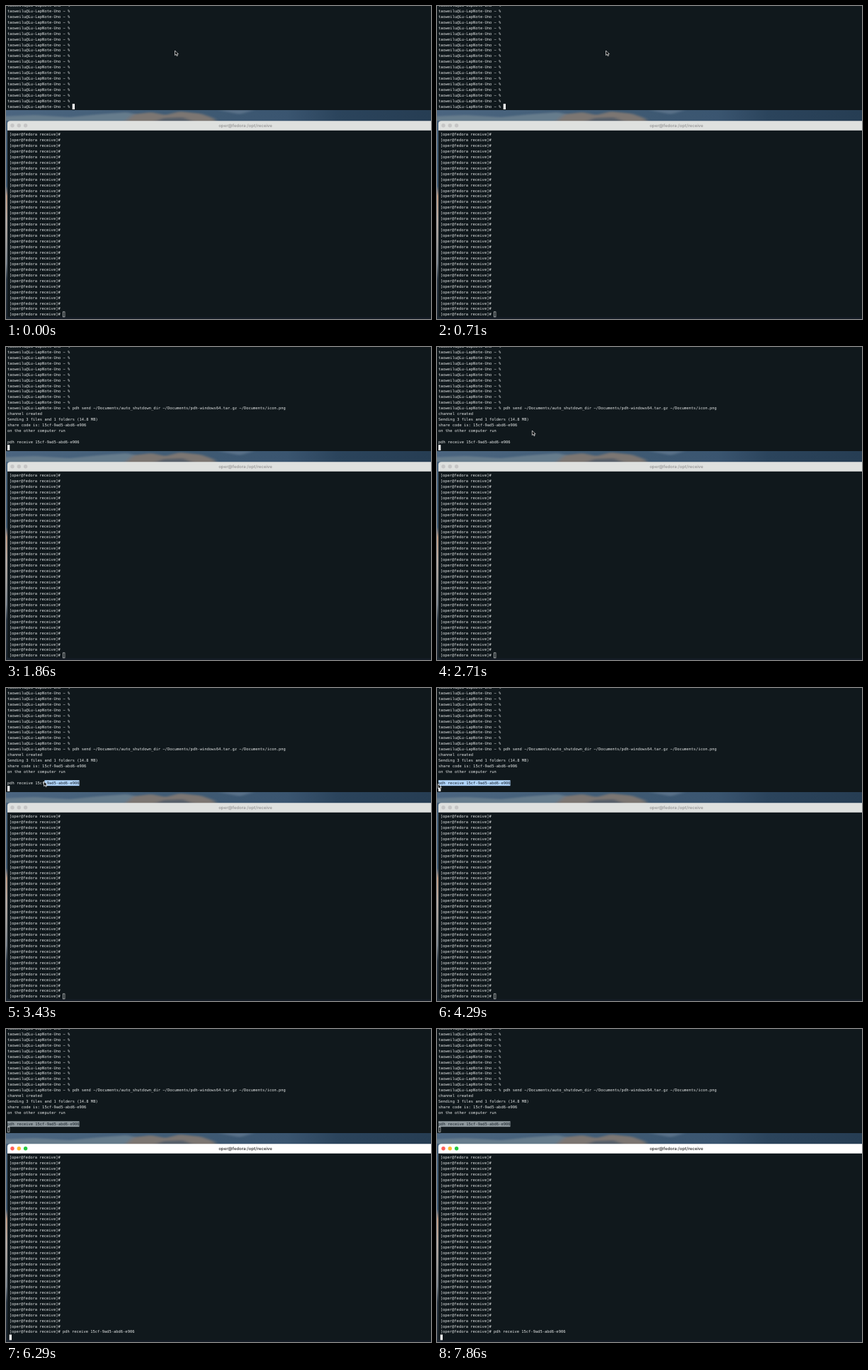
Write an HTML page that moves like this. It is 600 px wide and 442 px high and loops after 8000 ms.

```html
<!DOCTYPE html>
<html lang="en">
<head>
<meta charset="utf-8">
<title>Sending files between two terminals</title>
<style>
  html, body { margin: 0; width: 100%; height: 100%; overflow: hidden; background: #10181c; }
  svg { display: block; width: 100vw; height: 100vh; }
  text { white-space: pre; text-rendering: geometricPrecision; }
  .term { font: 5.44px "DejaVu Sans Mono", monospace; fill: #e2e5e5; }
  #title { font: 600 6px Inter, sans-serif; text-anchor: middle; }
</style>
</head>
<body>
<svg viewBox="0 0 600 442">
  <defs>
    <linearGradient id="sky">
      <stop offset="0" stop-color="#4b6580"/>
      <stop offset=".2" stop-color="#46617b"/>
      <stop offset=".45" stop-color="#3f5a73"/>
      <stop offset=".66" stop-color="#3a5570"/>
      <stop offset=".78" stop-color="#2b445c"/>
      <stop offset="1" stop-color="#263d53"/>
    </linearGradient>
    <linearGradient id="side" x2="0" y2="1">
      <stop offset="0" stop-color="#46607a"/>
      <stop offset=".33" stop-color="#3f5a75"/>
      <stop offset=".38" stop-color="#bd9880"/>
      <stop offset=".5" stop-color="#b5a9a2"/>
      <stop offset=".6" stop-color="#a09c9a"/>
      <stop offset=".72" stop-color="#77808a"/>
      <stop offset=".8" stop-color="#2a3644"/>
      <stop offset="1" stop-color="#1b2530"/>
    </linearGradient>
    <filter id="soft"><feGaussianBlur stdDeviation="3 1"/></filter>
    <clipPath id="gap"><path d="M0 147H600V176H0Z"/></clipPath>
  </defs>

  <rect width="600" height="442" fill="#151c26"/>
  <rect y="147" width="600" height="20" fill="url(#sky)"/>
  <g clip-path="url(#gap)"><g filter="url(#soft)">
    <path d="M-10 166V156L40 154L90 157L130 153L170 150L190 154V166Z" fill="#667b8c"/>
    <path d="M165 166L180 153L205 150L225 154L245 149L275 152L292 158L300 166Z" fill="#7c7672"/>
    <path d="M205 166L222 158L250 157L270 166Z" fill="#59606a"/>
    <path d="M300 147L350 147L330 153Z" fill="#587087"/>
  </g></g>
  <rect y="162" width="6" height="280" fill="url(#side)"/>
  <rect width="600" height="147" fill="#10181c"/>

  <path d="M2 175H600V439.5H5Q2 439.5 2 436.5Z" fill="#10181c"/>
  <path id="bar" d="M2 175.7V166.3Q2 162.3 6 162.3H600V175.7Z"/>
  <g id="lights">
    <circle cx="9" cy="168.8" r="2.7"/>
    <circle cx="18.3" cy="168.8" r="2.7"/>
    <circle cx="27.6" cy="168.8" r="2.7"/>
  </g>
  <text id="title" x="338" y="170.9">oper@fedora:/opt/receive</text>

  <rect id="sel" y="130.2" height="7.96"/>
  <g id="top" class="term"></g>
  <g id="bottom" class="term"></g>
  <rect id="topCursor" stroke-width=".7"/>
  <rect id="bottomCursor" stroke-width=".7"/>

  <path id="arrow" d="M0 0V6.6L1.6 5.2L2.7 7.6L3.8 7.1L2.8 4.8H4.8Z" fill="#000" stroke="#fff" stroke-width=".7"/>
  <path id="beam" d="M-1.8 -3.8Q0 -3.8 0 -2.6Q0 -3.8 1.8 -3.8M0 -2.6V2.6M-1.8 3.8Q0 3.8 0 2.6Q0 3.8 1.8 3.8M-1 1H1" fill="none" stroke="#e8e8e8" stroke-width=".8"/>
</svg>
<script>
const $ = id => document.getElementById(id);
const LOOP = 8000, STEP = 1000 / 7, CELL = 3.275;
const HOST = 'taoweilu@Lu-LapNote-Uno ~ % ';
const ROOM = '[oper@fedora receive]# ';
const RECEIVE = 'pdh receive 15cf-9ad5-abd6-e906';
const SEND = 'pdh send ~/Documents/auto_shutdown_dir ~/Documents/pdh-windows64.tar.gz ~/Documents/icon.png';
const REPLY = ['Sending 3 files and 1 folders (14.8 MB)', 'share code is: 15cf-9ad5-abd6-e906',
  'on the other computer run', '', RECEIVE, ''];

// Steps at which things happen
const PASTE = 8, ENTER = 9, SENT = 11, RETURN = 17, DRAG = 20, FOCUS = 36, PASTE2 = 40, ENTER2 = 42;
// Pointer path: step, x, y
const PATH = [[0, 238.5, 63], [16, 238.5, 63], [RETURN, 196, 92], [DRAG, 103.5, 131], [24, 53.5, 132],
  [27, 1.5, 135.5], [31, 1.5, 135.5], [35, 164, 250], [56, 164, 250]];

function terminal(name, x, y, pitch, count) {
  const rows = Array.from({ length: count }, (_, i) => {
    const row = document.createElementNS('http://www.w3.org/2000/svg', 'text');
    row.setAttribute('x', x);
    row.setAttribute('y', y + i * pitch + 5.9);
    return $(name).appendChild(row);
  });
  return { x, rows, cursor: $(name + 'Cursor'), lastY: y + (count - 1) * pitch };
}
const upper = terminal('top', 2, -5.1, 7.96, 19);
const lower = terminal('bottom', 4.7, 177.1, 7.95, 33);

const set = (el, attrs) => { for (const k in attrs) el.setAttribute(k, attrs[k]); };
const show = (el, on) => { el.style.display = on ? '' : 'none'; };

function print(term, prompt, tail, active) {
  const { rows, cursor, x, lastY } = term;
  const lines = [...Array(rows.length).fill(prompt), ...tail].slice(-rows.length);
  rows.forEach((row, i) => { row.textContent = lines[i]; });
  const inset = active ? 0 : .35;
  set(cursor, {
    x: x + lines.at(-1).length * CELL + inset, y: lastY + inset,
    width: CELL - 2 * inset, height: 7.8 - 2 * inset,
    fill: active ? '#fff' : 'none', stroke: active ? 'none' : '#d0d3d3'
  });
}

function pointer(n) {
  const i = PATH.findIndex(p => p[0] > n);
  const [a, ax, ay] = PATH[i - 1], [b, bx, by] = PATH[i];
  const k = (n - a) / (b - a);
  return [ax + (bx - ax) * k, ay + (by - ay) * k];
}

function select(n, x, focused) {
  const size = RECEIVE.length;
  const start = n >= 27 ? 0 : Math.round((x - 2) / CELL);
  const on = n >= DRAG && start < size;
  show($('sel'), on);
  if (!on) return;
  set($('sel'), { x: 2 + start * CELL, width: (size - start) * CELL, fill: focused ? '#8d979c' : '#b0d4fb' });
  upper.rows.at(-2).innerHTML = `${RECEIVE.slice(0, start)}<tspan fill="#18222a">${RECEIVE.slice(start)}</tspan>`;
}

function draw(n) {
  const focused = n >= FOCUS;
  const sent = n < PASTE ? [] : n < ENTER ? [HOST + SEND]
    : [HOST + SEND, 'channel created', ...(n < SENT ? [''] : REPLY)];
  const received = n < PASTE2 ? [] : n < ENTER2 ? [ROOM + RECEIVE] : [ROOM + RECEIVE, ''];
  print(upper, HOST, sent, !focused);
  print(lower, ROOM, received, focused);

  set($('bar'), { fill: focused ? '#fff' : '#dfe1df' });
  set($('title'), { fill: focused ? '#3a3a3a' : '#9a9a9a' });
  [...$('lights').children].forEach((light, i) =>
    set(light, { fill: focused ? ['#ff5f57', '#febc2e', '#28c840'][i] : '#c6c6c6' }));

  const [x, y] = pointer(n);
  const visible = n < PASTE || n >= RETURN && n < PASTE2;
  const overText = y > 176;
  for (const id of ['arrow', 'beam']) set($(id), { transform: `translate(${x} ${y})` });
  show($('arrow'), visible && !overText);
  show($('beam'), visible && overText);
  select(n, x, focused);
}

let last = -1;
const began = performance.now();
function tick() {
  const n = Math.floor(((performance.now() - began) % LOOP + 6) / STEP) % 56;
  if (n !== last) draw(last = n);
  requestAnimationFrame(tick);
}
tick();
</script>
</body>
</html>
```
